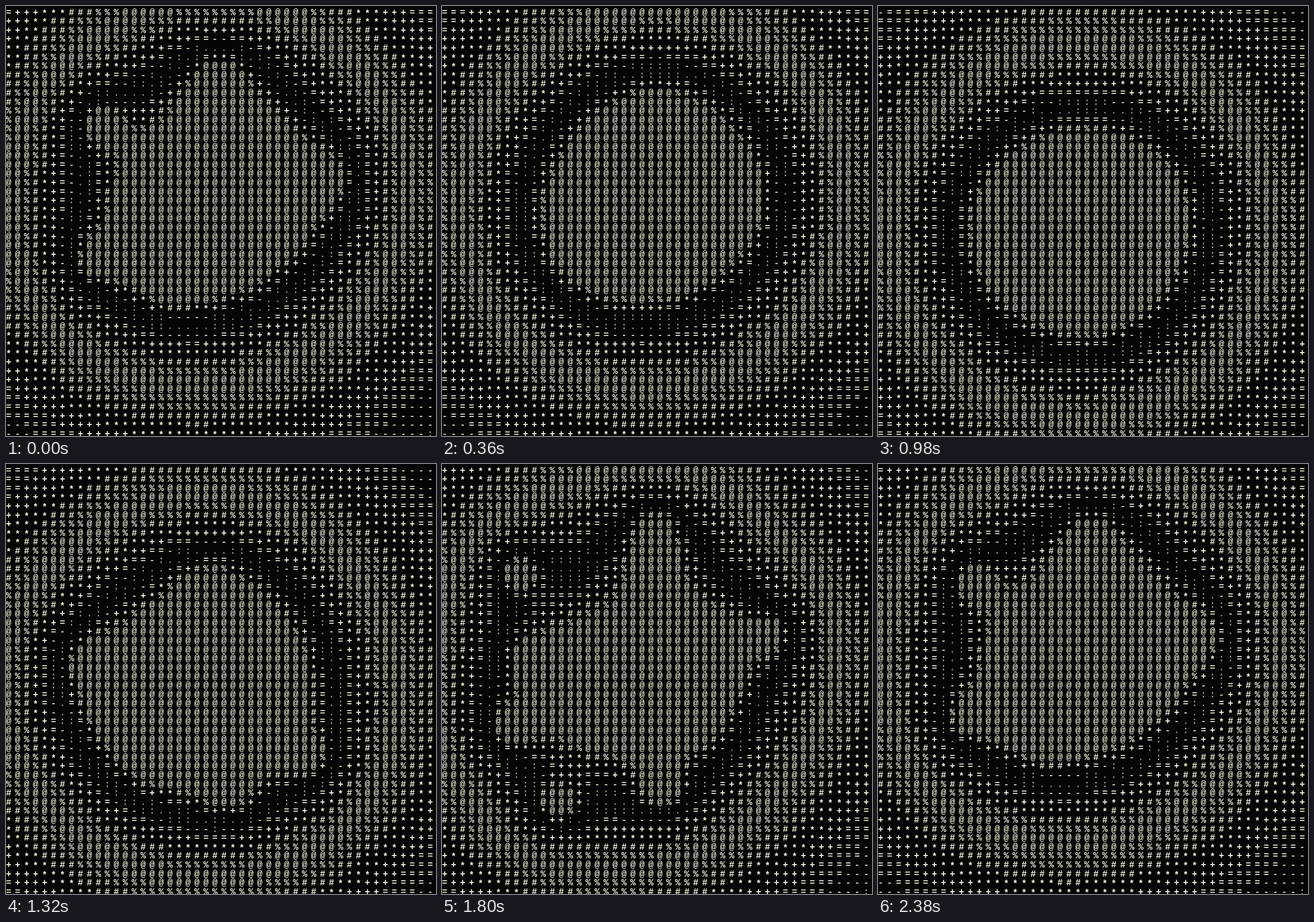
These frames come from a looping animation (748 px wide and 748 px high, 2400 ms). An HTML page with a canvas:

```html
<!DOCTYPE html>
<html lang="en">
<head>
<meta charset="utf-8">
<title>ASCII metaballs</title>
<style>
  html, body { margin: 0; width: 100%; height: 100%; overflow: hidden; background: #050505; }
  canvas { display: block; width: 748px; height: 748px; }
</style>
</head>
<body>
<canvas id="stage" width="748" height="748"></canvas>
<script>
const SIZE = 748, COUNT = 48, CELL = 15.6;
const STEP = 20, STEPS = 120;
const RAMP = '.:-=+*#%@';
const SMALL = 0.06, HALF_CORE = 0.23;
const ctx = document.getElementById('stage').getContext('2d');

// Each ball darts from the core to its far point and back:
// far point, moment of greatest reach, sharpness of the dart
const BALLS = [
  { x: 372, y: 102, peak: 0.86, sharp: 0.55 },
  { x: 372, y: 168, peak: 0.86, sharp: 0.55 },
  { x: 590, y: 290, peak: 0.86, sharp: 1 },
  { x: 532, y: 512, peak: 0.60, sharp: 3 },
  { x: 116, y: 460, peak: 0.83, sharp: 0.65 },
  { x: 200, y: 592, peak: 0.77, sharp: 1.2 },
  { x: 118, y: 340, peak: 0.65, sharp: 1.6 },
  { x: 95, y: 160, peak: 0.86, sharp: 1.5 },
  { x: 385, y: 575, peak: 0.66, sharp: 0.7 }
];

const wave = (t, peak) => Math.cos(2 * Math.PI * (t - peak));

function charges(t) {
  const cx = 362 + 12 * wave(t, 0.08);
  const cy = 365 + 22 * wave(t, 0.5);
  const list = BALLS.map(b => {
    const reach = ((1 + wave(t, b.peak)) / 2) ** b.sharp;
    return [cx + (b.x - cx) * reach, cy + (b.y - cy) * reach, SMALL];
  });
  for (const side of [-1, 1]) {
    list.push([cx + 68 * side, cy - 22 * side, HALF_CORE]);
  }
  return list;
}

// Solid inside, then a dark moat and one bright ring fading outwards
function level(f) {
  const v = f > 0.0046
    ? (f - 0.0046) / 0.00014
    : 8.99 - Math.abs(f - 0.00307) / 0.000182;
  return Math.max(0, Math.min(8, Math.floor(v)));
}

function draw(t) {
  const list = charges(t);
  ctx.globalAlpha = 1;
  ctx.fillStyle = '#050505';
  ctx.fillRect(0, 0, SIZE, SIZE);
  ctx.fillStyle = '#f5f5dc';
  ctx.font = 'bold 15.6px "Liberation Mono", monospace';
  ctx.textBaseline = 'alphabetic';
  for (let row = 0; row < COUNT; row++) {
    for (let col = 0; col < COUNT; col++) {
      const x = col * CELL, y = row * CELL;
      let f = 0;
      for (const [bx, by, q] of list) {
        f += q / Math.max(1, Math.hypot(x + 5 - bx, y + 11 - by));
      }
      const n = level(f);
      ctx.globalAlpha = Math.min(1, 0.6 + 0.1 * n);
      ctx.fillText(RAMP[n], x, y + CELL + (RAMP[n] === '*' ? 2 : 0));
    }
  }
}

let shown = -1;
function tick(now) {
  const step = Math.floor(now / STEP) % STEPS;
  if (step !== shown) {
    shown = step;
    draw(step / (STEPS - 1));
  }
  requestAnimationFrame(tick);
}
draw(0);
requestAnimationFrame(tick);
</script>
</body>
</html>
```
